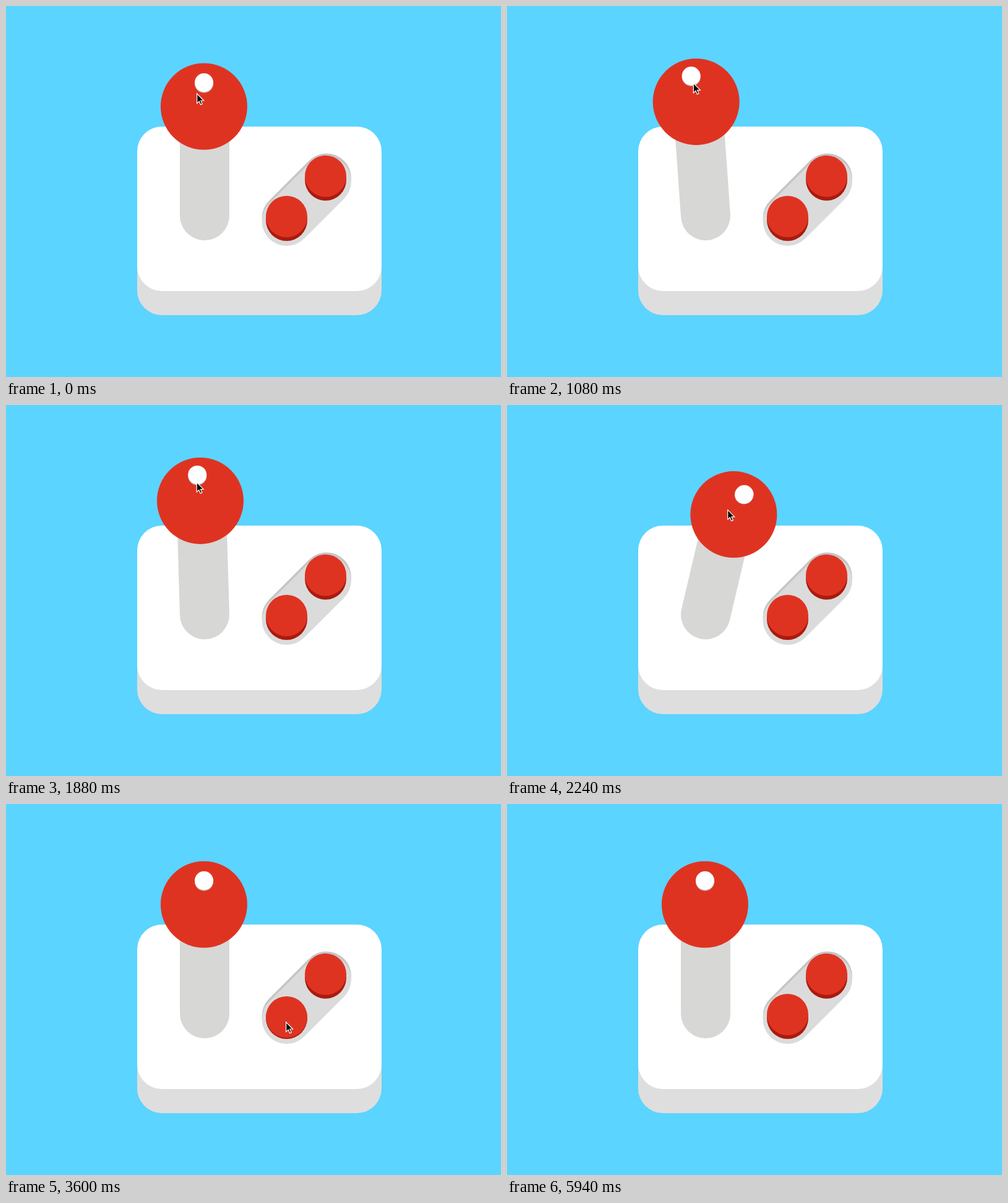
Recreate the animation shown at these times as an HTML page. Size 800 by 600 pixels, loop 5.98 s.

```html
<!DOCTYPE html>
<html lang="en">
<head>
<meta charset="utf-8">
<title>Joystick</title>
<style>
  html, body { margin: 0; width: 100%; height: 100%; overflow: hidden; background: #5bd4ff; }
  svg { display: block; width: 800px; height: 600px; }
  .red { fill: #df3322; }
  .slot { stroke-width: 80; stroke-linecap: round; }
  .side { stroke: #a91b0e; stroke-width: 67; stroke-linecap: round; }
</style>
</head>
<body>
<svg viewBox="0 0 800 600">
  <rect x="212" y="234" width="395" height="266" rx="40" fill="#dedede"/>
  <rect x="212" y="195" width="395" height="266" rx="40" fill="#fff"/>

  <path class="slot" d="M453.5 343L518 278.5" stroke="#c5c5c5"/>
  <path class="slot" d="M453.5 348L518 283.5" stroke="#dbdbdb"/>
  <path class="side" d="M516.5 281.2v.1M453.5 346.4v.1"/>
  <g id="high">
    <circle class="red" cx="516.5" cy="275.3" r="33.5"/>
  </g>
  <g id="low">
    <circle class="red" cx="453.5" cy="340.5" r="33.5"/>
  </g>

  <rect id="stick" x="281" width="80" rx="40" fill="#d7d7d6"/>
  <g id="ball">
    <circle class="red" cx="319.9" cy="162.5" r="70"/>
    <g id="shine">
      <circle id="shade" cx="320" cy="123.8" r="15" fill="#c9c3c2"/>
      <circle cx="320" cy="123.8" r="15" fill="#fff"/>
    </g>
  </g>
  <path id="cursor" d="M.6 .8V16.4L4.2 13 6.6 18.6 9.2 17.5 6.8 12H11.6Z" fill="#000" stroke="#fff" stroke-width="1.2"/>
</svg>
<script>
const LOOP = 5980;
const EXIT = 4980;
const [stick, ball, shine, shade, cursor, high, low] =
  ['stick', 'ball', 'shine', 'shade', 'cursor', 'high', 'low']
    .map(id => document.getElementById(id));

const clamp = x => Math.max(0, Math.min(1, x));
const mix = (a, b, u) => a + (b - a) * u;
const ease = (t, from, to) => {
  const u = clamp((t - from) / (to - from));
  return u * u * (3 - 2 * u);
};

// The drag circles clockwise: time and angle from the bottom
const turns = [[0, -2.2], [660, -0.577], [1540, 7.274], [2240, 10.885], [2880, 11.885]];

function angle(t) {
  const last = turns.length - 1;
  if (t >= turns[last][0]) return turns[last][1];
  const i = turns.findIndex(([time]) => time > t) - 1;
  const speed = j => (turns[j + 1][1] - turns[j][1]) / (turns[j + 1][0] - turns[j][0]);
  const tangent = j => {
    if (j === 0 || j === last) return 0;
    const a = speed(j - 1), b = speed(j);
    return 2 * a * b / (a + b);
  };
  const [[t0, a0], [t1, a1]] = [turns[i], turns[i + 1]];
  const u = (t - t0) / (t1 - t0), v = 1 - u;
  return mix(a0, a1, u * u * (1 + 2 * v))
    + (t1 - t0) * u * v * (v * tangent(i) - u * tangent(i + 1));
}

// Tilted ellipse that widens during the second round
function orbit(t) {
  t = Math.max(0, t);
  const a = angle(t), grip = ease(t, 0, 330);
  const x = -4 - (33 + 17.8 * ease(t, 1000, 1500)) * Math.sin(a);
  const y = 12 + 19 * Math.cos(a) + 0.1 * x;
  return [x * grip, y * grip];
}

function ballAt(t) {
  const [x, y] = orbit(t), hold = 1 - ease(t, 2640, 3030);
  return [x * hold, y * hold ** 3];
}

// Cursor moves after the drag: start, end, x, y
const legs = [
  [2500, 2860, 337, 197],
  [2880, 3400, 452, 352],
  [3760, 4220, 512, 276],
  [4640, EXIT, 660, 290]
];

function cursorAt(t) {
  const [x, y] = orbit(t + 20);
  let pos = [308 + 1.03 * x, 141 + 2.4 * y - 0.2 * x];
  if (t <= 0) pos = [308, 141];
  for (const [from, to, ...goal] of legs) {
    const u = ease(t, from, to);
    pos = pos.map((p, i) => mix(p, goal[i], u));
  }
  return pos;
}

const press = (t, start) => 5 * Math.min(clamp((t - start) / 100), clamp((start + 240 - t) / 100));
const move = (el, x, y) => el.setAttribute('transform', `translate(${x} ${y})`);

function draw(t) {
  const [x, y] = ballAt(t);
  const top = 170 + Math.max(0, y);
  stick.setAttribute('y', top);
  stick.setAttribute('height', 379 - top);
  stick.setAttribute('transform', `rotate(${x * 0.285} 321 339)`);
  move(ball, x, y);
  move(shine, 0.37 * ballAt(t - 25)[0], 0.43 * y);
  move(shade, -0.015 * x, 1.7 * clamp(1 - y / 28));
  move(low, 0, press(t, 3520));
  move(high, 0, press(t, 4400));
  move(cursor, ...cursorAt(t));
  cursor.style.display = t > EXIT ? 'none' : '';
}

const start = performance.now();
function tick(now) {
  const t = Math.max(0, now - start) % LOOP;
  draw(Math.floor(t / 20) * 20);
  requestAnimationFrame(tick);
}
draw(0);
requestAnimationFrame(tick);
</script>
</body>
</html>
```
